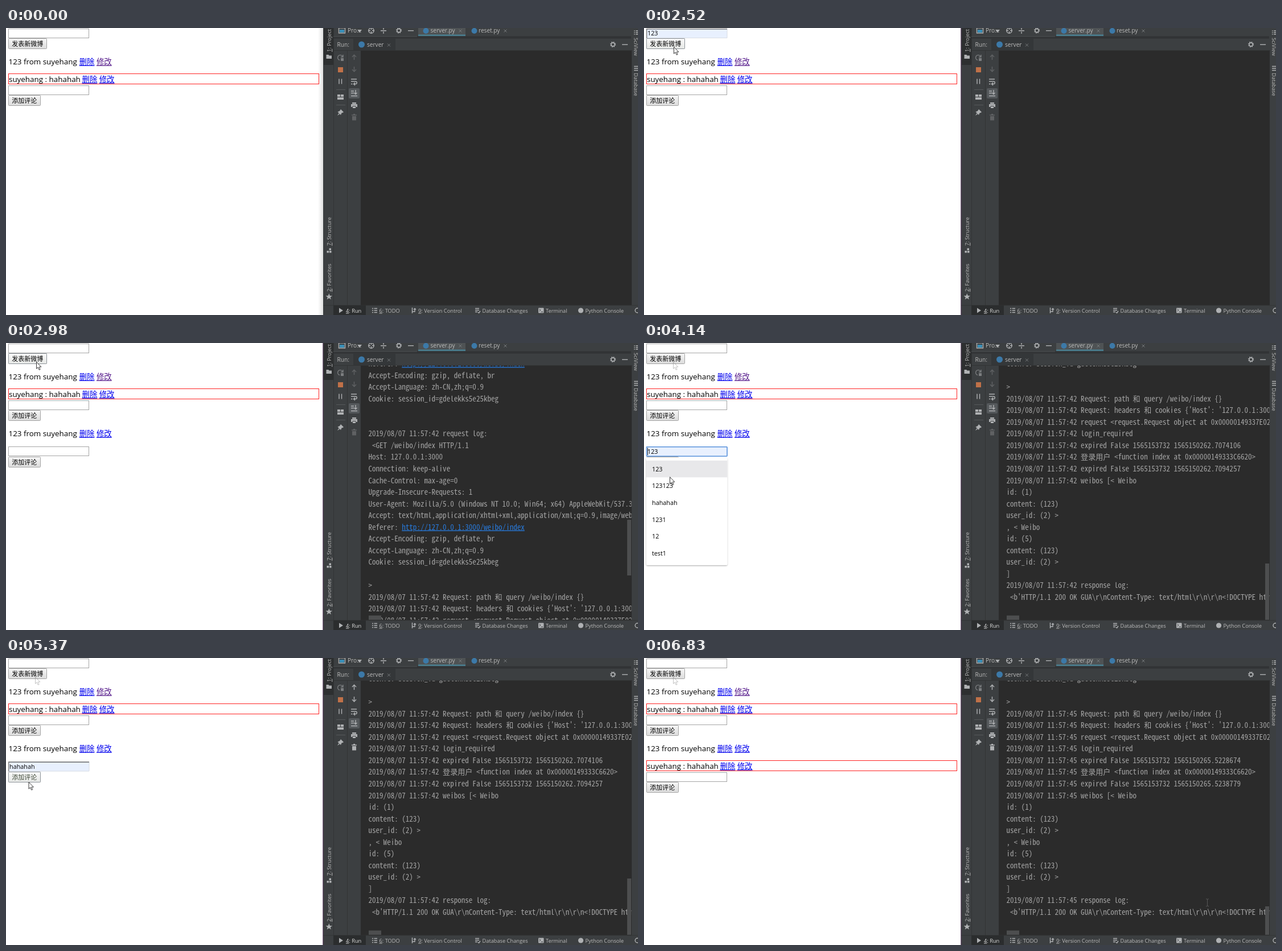
Animation of 1110 by 505 pixels, one loop 6910 ms. Source, as an HTML page:

```html
<!DOCTYPE html>
<html lang="zh-CN">
<head>
<meta charset="utf-8">
<title>Comment demo</title>
<style>
html, body { margin: 0; width: 100%; height: 100%; overflow: hidden; background: #fff; }
svg { display: block; width: 100vw; height: 100vh; }
text { white-space: pre; }
.page { font: 13.4px "Open Sans", "Noto Sans CJK SC", "Noto Sans CJK", sans-serif; }
.small { font-size: 10.8px; }
.label { font-size: 11px; }
.link { fill: #00e; text-decoration: underline; }
.seen { fill: #551a8b; }
.box { fill: #fff; stroke: #a6a6a6; }
.focus { fill: #e8f0fe; stroke: #5a93dc; stroke-width: 1.6; }
.button { fill: url(#face); stroke: #a3a3a3; }
.over { fill: url(#lit); stroke: #8c9298; }
.note { fill: none; stroke: #f22; }
.ui { font: 9.25px "Open Sans", "Noto Sans", sans-serif; fill: #bbb; }
.tab { font-size: 10.1px; }
.key { text-decoration: underline; }
.log { font: 13.07px "Noto Sans Mono CJK SC", "Noto Sans Mono CJK JP", "Noto Sans CJK SC", monospace; fill: #a6a6a6; }
.log .link { fill: #287bde; }
.ico { fill: none; stroke: #afb1b3; stroke-width: 1.4; }
.fill { fill: #afb1b3; stroke: none; }
.dim { opacity: .3; }
.thumb { fill: #4d4e4f; }
#mouse { animation: travel 6910ms linear infinite; }
@keyframes travel {
  0%, 4.05% { transform: translate(701px, 369px); }
  5.79% { transform: translate(480px, 250px); }
  7.53% { transform: translate(230px, 95px); }
  9.26% { transform: translate(95px, 25px); }
  10.56%, 14.6% { transform: translate(62px, 11px); }
  19.4%, 21.6% { transform: translate(66px, 33px); }
  21.85% { transform: translate(68px, 34px); }
  22.87%, 25.3% { transform: translate(69px, 35px); }
  35.3%, 41% { transform: translate(52px, 33px); }
  43.1%, 44.1% { transform: translate(53px, 33px); }
  48.6%, 52% { transform: translate(44px, 190px); }
  54.4% { transform: translate(44px, 204px); }
  59.9% { transform: translate(45px, 235px); }
  63.4%, 65.6% { transform: translate(42px, 275px); }
  69.5% { transform: translate(41px, 250px); }
  75.5%, 82.5% { transform: translate(39.5px, 218px); }
  86% { transform: translate(500px, 290px); }
  90%, 91% { transform: translate(986px, 430px); }
  93.8% { transform: translate(1030px, 470px); }
  96.7%, 100% { transform: translate(1076px, 494px); }
}
</style>
</head>
<body>
<svg viewBox="0 0 1110 505" preserveAspectRatio="none">
<defs>
  <linearGradient id="face" x2="0" y2="1"><stop stop-color="#f6f6f6"/><stop offset="1" stop-color="#dcdcdc"/></linearGradient>
  <linearGradient id="lit" x2="0" y2="1"><stop stop-color="#fafafa"/><stop offset="1" stop-color="#e6e8e6"/></linearGradient>
  <linearGradient id="shade"><stop stop-color="#000" stop-opacity="0"/><stop offset="1" stop-color="#000" stop-opacity=".12"/></linearGradient>
  <filter id="soft" x="-10%" y="-10%" width="120%" height="120%"><feDropShadow dx="0" dy="1" stdDeviation="1.3" flood-opacity=".35"/></filter>
  <clipPath id="console"><rect x="623" y="40" width="475.5" height="447"/></clipPath>
  <path id="arrow" d="M.5 .5V12.2L3.2 9.8 5.2 14.3 7.1 13.5 5.2 9.1H8.9Z" fill="#fff" stroke="#222" stroke-width=".9"/>
  <path id="beam" d="M1 -6H2.7L3.5 -5.2 4.3 -6H6M3.5 -5.2V6M1 6.8H2.7L3.5 6 4.3 6.8H6" fill="none" stroke="#ccc" stroke-width=".9"/>
  <path id="cross" d="M-2.5 -2.5L2.5 2.5M2.5 -2.5L-2.5 2.5" stroke="#75797b"/>
  <g id="gear"><circle r="3" class="ico" stroke-width="2"/><circle r="4.3" class="ico" stroke-dasharray="1.9 1.48"/></g>
  <g id="logTools"><path class="ico" d="M611.5 56V47M608 51L611.5 47.2 615 51M611.5 68V77M608 73L611.5 76.8 615 73"/><path class="fill" d="M608 155H615V162.5H608ZM607 152.5H616V154H607ZM610 151H613V153H610Z"/></g>
  <rect id="field" class="box" x="4.5" y="1.5" width="141" height="16"/>
  <rect id="fieldOn" class="focus" x="4.5" y="1.2" width="141.5" height="16.6" rx="1"/>
  <g id="filled"><rect x="4" y="1" width="142" height="17" fill="#e8f0fe"/><path d="M4 17.5H146V1" fill="none" stroke="#d9dde4"/><path d="M4.7 18V1.7H146" fill="none" stroke="#777" stroke-width="1.4"/></g>
  <g id="add"><rect class="button" x="4.5" y="18.5" width="56" height="18" rx="1"/><text class="label" x="10.3" y="32.4">添加评论</text></g>
  <g id="addOver"><rect class="button over" x="4.5" y="18.5" width="56" height="18" rx="1"/><text class="label" x="10.3" y="32.4" fill="#414b3a">添加评论</text></g>
  <g id="post"><text x="4.5" y="64.4">123 from suyehang</text><text class="link" x="128.7" y="64.4">删除</text></g>
  <g id="comment"><rect class="note" x="4.5" y="80.5" width="545" height="18"/><text x="5" y="95.2">suyehang : hahahah</text><text class="link" x="133.5" y="95.2">删除</text><text class="link" x="163.7" y="95.2">修改</text></g>
  <g id="menu">
    <rect x="4" y="20.5" width="142.3" height="189" rx="2" fill="#fff" filter="url(#soft)"/>
    <rect x="4" y="20" width="142.3" height="12" fill="#fff"/>
  </g>
  <rect id="pick" x="4" y="25.3" width="142.3" height="29.6" fill="#e8e8ea"/>
  <g id="words"></g>
</defs>

<rect width="1110" height="505" fill="#fff"/>
<g class="page">
  <use href="#field"/>
  <rect class="button" x="4.5" y="18.5" width="67" height="18" rx="1"/>
  <rect class="button over" x="4.5" y="18.5" width="67" height="18" rx="1" data-on="2520-3050"/>
  <text class="label" x="10.3" y="32.4">发表新微博</text>
  <use href="#post"/><text class="link seen" x="158.9" y="64.4">修改</text>
  <use href="#comment"/>
  <use href="#field" y="100"/><use href="#add" y="100"/>

  <g data-on="2740-6910"><use href="#post" y="100"/><text class="link" x="158.9" y="164.4">修改</text></g>
  <g data-on="2740-5620">
    <use href="#field" y="181"/><use href="#add" y="182"/>
    <g data-on="5290-5620"><use href="#addOver" y="182"/></g>
  </g>
  <g data-on="5620-6910"><use href="#comment" y="100"/><use href="#field" y="200"/><use href="#add" y="200"/></g>

  <g data-on="960-2440"><use href="#fieldOn"/></g>
  <g data-on="2440-2740"><use href="#filled"/></g>
  <text class="small" x="6" y="13" data-on="1340-2740">123</text>
  <path d="M6.5 3V16" stroke="#222" data-on="960-1750"/>
  <g data-on="1110-1800">
    <use href="#menu"/><g data-on="1340-1800"><use href="#pick"/></g><use href="#words"/>
  </g>

  <g transform="translate(0 181.5)">
    <g data-on="3440-5290"><use href="#fieldOn"/></g>
    <g data-on="5290-5620"><use href="#filled"/></g>
    <text class="small" x="6" y="13" data-on="3760-4220">123</text>
    <text class="small" x="6" y="13" data-on="4220-4380">123123</text>
    <text class="small" x="6" y="13" data-on="4380-5620">hahahah</text>
    <path d="M6.5 3V16" stroke="#222" data-on="3440-4530"/>
    <g data-on="3590-4600">
      <use href="#menu"/>
      <g data-on="3760-4220"><use href="#pick"/></g>
      <g data-on="4220-4380"><use href="#pick" y="29.6"/></g>
      <g data-on="4380-4600"><use href="#pick" y="59.2"/></g>
      <use href="#words"/>
    </g>
  </g>
</g>

<rect x="548" width="9" height="505" fill="url(#shade)" data-on="0-960"/>
<g class="ui">
  <rect x="557" width="553" height="505" fill="#3c3f41"/>
  <path d="M556.8 0V505" stroke="#4b2c50" data-on="960-6910"/>
  <rect x="558" width="17" height="65" fill="#2d2f30"/>
  <path d="M575.5 0V488M599.5 40V488" stroke="#323435"/>
  <rect x="575" y="14.5" width="523" height="4" fill="#313335"/>
  <path d="M575 15H722" stroke="#515456"/>
  <rect x="724" width="83" height="14" fill="#4e5254"/>
  <rect x="724" y="11.5" width="83" height="2.6" fill="#4a7f90"/>
  <rect x="610" y="19" width="74" height="20" fill="#343739"/>
  <rect x="623" y="39" width="476" height="449" fill="#2b2b2b"/>
  <path d="M575 39.5H1098M557 488H1110" stroke="#323435"/>
  <rect x="575" y="488" width="57" height="17" fill="#2b2d2e"/>

  <!-- top row -->
  <rect x="584.5" y="0" width="11" height="9" class="ico"/><rect x="586" y="3" width="8" height="5" fill="#3a8fb7"/>
  <text class="tab" x="600" y="8.3">Pro...</text><path class="fill" d="M617 3H625L621 8Z"/>
  <circle class="ico" cx="641.5" cy="4.5" r="4.6"/><path class="ico" d="M641.5 -1V3M641.5 6V10M636 4.5H640M643 4.5H647"/>
  <path class="ico" d="M658 4.7H668M663 0V3M663 6.5V10"/>
  <use href="#gear" x="690" y="4.5"/><path class="ico" d="M706 4.7H716"/>
  <circle cx="737.5" cy="5" r="5" fill="#3c79a8"/><text class="tab" x="745.5" y="8.3">server.py</text><use href="#cross" x="798" y="5"/>
  <circle cx="822.5" cy="5" r="5" fill="#3c79a8"/><text class="tab" x="830" y="8.3">reset.py</text><use href="#cross" x="877" y="5"/>
  <text class="tab" x="581.5" y="33">Run:</text>
  <circle cx="624.5" cy="29" r="5.5" fill="#3c79a8"/><text class="tab" x="634" y="33">server</text><use href="#cross" x="672.5" y="30"/>
  <use href="#gear" x="1066" y="29"/><path class="ico" d="M1082 29.2H1092"/>

  <!-- run tools -->
  <g opacity=".55"><path class="ico" d="M591 50A4.5 4.5 0 1 0 586 56.5M592 47V51H588"/><rect class="fill" x="588" y="53" width="5" height="5"/></g>
  <rect x="583" y="69" width="9" height="9" fill="#bf7148"/>
  <path class="ico" d="M585 89.5V98.5M589.5 89.5V98.5"/>
  <path d="M580 108.5H596M580 135.5H596" stroke="#55585a"/>
  <path class="fill" d="M582 117H587V121H582ZM588 117H593V121H588ZM582 122H593V126H582Z"/>
  <path class="fill" d="M588 143L593 148 591.5 149 589.5 149.5 588 153 582.5 147.5 586 146ZM584.5 150L582 154 586 151.5Z"/>
  <rect x="602" y="106" width="19" height="18" rx="2" fill="#55595c"/>
  <g class="dim" data-on="0-4600"><use href="#logTools"/></g>
  <g data-on="4600-6910"><use href="#logTools"/></g>
  <path class="ico" d="M606 90H616M606 94H614A2.2 2.2 0 0 1 614 98.5H611M613 96L610.5 98.5 613 101M606 98.5H608.5"/>
  <path class="ico" d="M606 111H611M606 114.5H611M606 119.5H617M614 109V116M611.5 114L614 116.5 616.5 114"/>
  <path class="fill" d="M608 131H615V133.5H608ZM606 134H617V139H614.5V137H608.5V139H606ZM609 138H614V141H609Z"/>

  <!-- side stripes -->
  <text transform="translate(571.3 42) rotate(-90)"><tspan class="key">1</tspan>: Project</text>
  <text transform="translate(571.3 383) rotate(-90)"><tspan class="key">7</tspan>: Structure</text>
  <text transform="translate(571.3 464) rotate(-90)"><tspan class="key">2</tspan>: Favorites</text>
  <text transform="translate(1103 17) rotate(90)">SciView</text>
  <text transform="translate(1103 79) rotate(90)">Database</text>
  <path class="fill" d="M562.5 47H566.5L567.5 48.5H572V54H562.5ZM567.5 387.5H571V391H567.5ZM563.5 392H567V395.5H563.5ZM568 392H571.5V395.5H568Z"/>
  <path class="fill" d="M567.3 467L568.8 471 573 471.2 569.7 473.7 570.9 477.7 567.3 475.3 563.7 477.7 564.9 473.7 561.6 471.2 565.8 471Z"/>
  <path class="ico" d="M1103 5H1104.5M1106 5H1110M1103 8H1104.5M1106 8H1110M1103 11H1104.5M1106 11H1110"/>
  <path class="ico" d="M1103 67.5H1110M1103 71H1110M1103 74.5H1110"/>

  <!-- bottom row -->
  <path class="fill" d="M585 492.5L592 497 585 501.5Z"/>
  <text x="597" y="500.6" fill="#ddd"><tspan class="key">4</tspan>: Run</text>
  <path class="ico" d="M643 493.5H645M646.5 493.5H652M643 497H645M646.5 497H652M643 500.5H645M646.5 500.5H652"/>
  <text x="655.5" y="500.6"><tspan class="key">6</tspan>: TODO</text>
  <path class="ico" d="M713.5 492V502M713.5 499H718V494M716 495.5L718 493.5 720 495.5"/>
  <text x="724" y="500.6"><tspan class="key">9</tspan>: Version Control</text>
  <path class="ico" d="M824 493.5H831M824 496.5H831M824 499.5H828M829 500L830.5 501.5 833 498"/>
  <text x="836.5" y="500.6">Database Changes</text>
  <rect class="fill" x="935" y="492.5" width="9.5" height="9" rx="1"/><path d="M936.5 494.5L939 496.5 936.5 498.5M940 499.5H943" fill="none" stroke="#3c3f41"/>
  <text x="948" y="500.6">Terminal</text>
  <circle class="fill" cx="1009.5" cy="497" r="4.6"/>
  <text x="1017.5" y="500.6">Python Console</text>
  <circle class="ico" cx="1109" cy="497" r="4"/>
</g>

<g clip-path="url(#console)">
  <g class="log" id="log"></g>
  <g class="thumb">
    <rect x="637" y="479.5" width="22" height="8" data-on="2740-6910"/>
    <rect x="1091" y="311" width="7" height="98" data-on="2740-3050"/>
    <rect x="1091" y="388" width="7" height="99" data-on="3050-5700"/>
    <rect x="1091" y="437" width="7" height="50" data-on="5700-6910"/>
  </g>
</g>

<g data-on="3050-6910"><use href="#arrow" x="51" y="33" opacity=".3"/></g>
<g data-on="6370-6910"><use href="#beam" x="986" y="430" opacity=".3"/></g>
<g id="mouse">
  <g data-on="340-6000 6600-6830"><use href="#arrow"/></g>
  <g data-on="280-340 6000-6600"><use href="#beam"/></g>
</g>
</svg>
<script>
const LOOP = 6910, PITCH = 20.53;
const NS = 'http://www.w3.org/2000/svg';
const $ = id => document.getElementById(id);

function add(parent, tag, attrs, text = '') {
  const el = document.createElementNS(NS, tag);
  for (const k in attrs) el.setAttribute(k, attrs[k]);
  el.textContent = text;
  parent.append(el);
  return el;
}

['123', '123123', 'hahahah', '1231', '12', 'test1'].forEach((word, i) =>
  add($('words'), 'text', { class: 'small', x: 14, y: 44.3 + i * 29.6 }, word));

const tail = `Referer: http://127.0.0.1:3000/weibo/index
Accept-Encoding: gzip, deflate, br
Accept-Language: zh-CN,zh;q=0.9
Cookie: session_id=gdelekks5e25kbeg
`;

const lines = (sec, first, second) => `${tail}
@request log:
 <GET /weibo/index HTTP/1.1
Host: 127.0.0.1:3000
Connection: keep-alive
Cache-Control: max-age=0
Upgrade-Insecure-Requests: 1
User-Agent: Mozilla/5.0 (Windows NT 10.0; Win64; x64) AppleWebKit/537.36
Accept: text/html,application/xhtml+xml,application/xml;q=0.9,image/webp
${tail}>
@Request: path 和 query /weibo/index {}
@Request: headers 和 cookies {'Host': '127.0.0.1:3000',
@request <request.Request object at 0x00000149337E0240>
@login_required
@expired False 1565153732 ${first}
@登录用户 <function index at 0x00000149333C6620>
@expired False 1565153732 ${second}
@weibos [< Weibo
id: (1)
content: (123)
user_id: (2) >
, < Weibo
id: (5)
content: (123)
user_id: (2) >
]
@response log:
 <b'HTTP/1.1 200 OK GUA\\r\\nContent-Type: text/html\\r\\n\\r\\n\\r\\n<!DOCTYPE html>`
  .replace(/@/g, `2019/08/07 11:57:${sec} `)
  .replace('kbeg\n', 'kbeg\n\n')
  .replace('kbeg\n>', 'kbeg\n\n>')
  .replace(/\n{3,}/, '\n\n\n')
  .replace('\\r\\n\\r\\n\\r\\n', '\\r\\n\\r\\n')
  .replace('html\\r\\n\\r\\n', 'html\\r\\n\\r\\n')
  .split('\n');

function showLog(rows, skip, on) {
  const g = add($('log'), 'g', { 'data-on': on });
  rows.forEach((row, i) => {
    const y = 41.2 + (i - skip) * PITCH;
    if (y < 30 || y > 505) return;
    const [head, url] = row.split(/(?=http:)/);
    const t = add(g, 'text', { x: 636.5, y }, head);
    if (url) add(t, 'tspan', { class: 'link' }, url);
  });
}

const early = lines(42, '1565150262.7074106', '1565150262.7094257');
const late = lines(45, '1565150265.5228674', '1565150265.5238779');
showLog(early, 0, '2740-3050');
showLog(early, 17, '3050-5620');
showLog(late, 0, '5620-5780');
showLog(late, 17, '5780-6910');

// Turn each data-on="from-to ..." into a stepped keyframe rule.
let css = '';
document.querySelectorAll('[data-on]').forEach((el, i) => {
  const spans = el.dataset.on.split(' ').map(s => s.split('-').map(Number));
  const stops = spans.flatMap(([a, b]) => [[a, 'inherit'], [b, 'hidden']]).filter(([t]) => t < LOOP);
  if (stops[0][0] > 0) stops.unshift([0, 'hidden']);
  stops.push([LOOP, stops[stops.length - 1][1]]);
  const rule = stops.map(([t, v]) => `${t / LOOP * 100}%{visibility:${v}}`).join('');
  css += `@keyframes on${i}{${rule}}`;
  el.style.animation = `on${i} ${LOOP}ms step-end infinite`;
});
document.head.append(Object.assign(document.createElement('style'), { textContent: css }));
</script>
</body>
</html>
```
